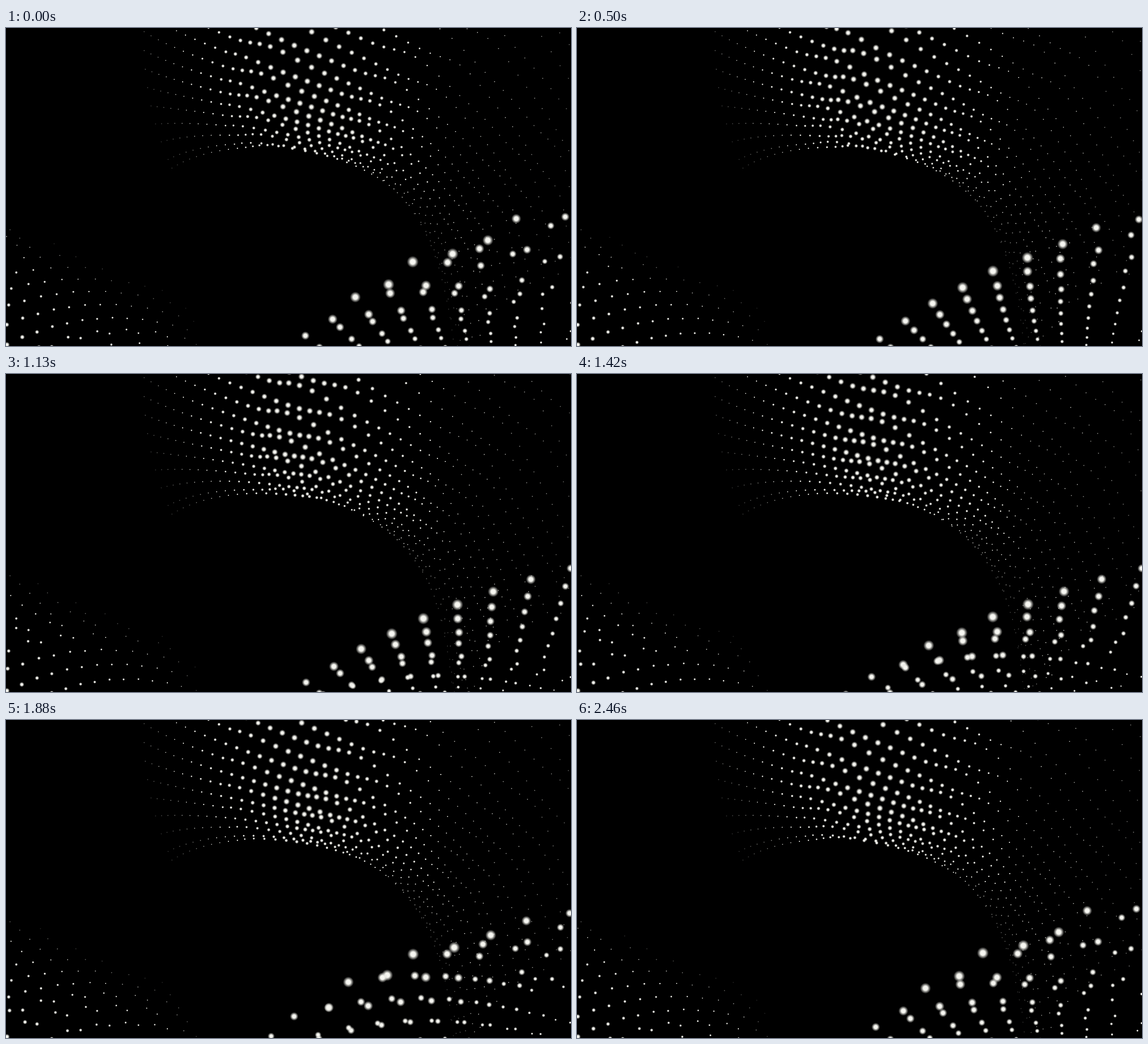
An HTML page with a canvas for the animation above (2500 ms loop, 998 by 561 pixels).

```html
<!DOCTYPE html>
<html lang="en">
<head>
<meta charset="utf-8">
<title>Particle waves</title>
<style>
  html, body { margin: 0; width: 100%; height: 100%; overflow: hidden; background: #000; }
  canvas { display: block; }
</style>
</head>
<body>
<canvas id="stage" width="998" height="561"></canvas>
<script>
const LOOP = 2500;
const ctx = document.getElementById('stage').getContext('2d');
const clamp = (x, lo, hi) => Math.min(hi, Math.max(lo, x));
const even = n => n % 2 === 0;

// Soft round dot, scaled for every particle.
const dotSprite = document.createElement('canvas');
dotSprite.width = dotSprite.height = 64;
const sctx = dotSprite.getContext('2d');
const glow = sctx.createRadialGradient(32, 32, 0, 32, 32, 32);
glow.addColorStop(0, 'rgba(250,250,246,1)');
glow.addColorStop(0.4, 'rgba(244,244,238,1)');
glow.addColorStop(0.7, 'rgba(230,230,224,.5)');
glow.addColorStop(1, 'rgba(200,200,195,0)');
sctx.fillStyle = glow;
sctx.fillRect(0, 0, 64, 64);

function dot(x, y, r) {
  if (r < 0.12 || x < -12 || x > 1010 || y < -12 || y > 573) return;
  const size = Math.max(r, 1) * 1.25;
  ctx.globalAlpha = Math.min(1, r);
  ctx.drawImage(dotSprite, x - size, y - size, size * 2, size * 2);
}

// Gaussian bump in time that repeats with the loop.
function pulse(t, peak, width) {
  const span = t - peak + LOOP / 2;
  const d = span - Math.floor(span / LOOP) * LOOP - LOOP / 2;
  return Math.exp(-((d / width) ** 2));
}

// Each sheet maps grid coordinates to the stage.
const hill = (u, v) => [
  504 + 395 * Math.tanh(u / 19) - (6.2 + 0.35 * u) * v + v * v,
  107 + 7 * u + 0.08 * u ** 2 + 0.004 * u ** 3
    + (20 - 0.6 * u + 0.02 * u * u) * v + (0.0025 * u * u - 0.75) * v * v
];

const valley = (a, b) => [
  4 + 4 * b + 1.3 * b * b + (28.5 + b) * a,
  490 - 32 * b + 1.6 * b * b + (1.8 * b - 9.5) * a + 0.9 * a * a
];

const crest = (c, r) => [
  535 + 43.6 * c + 1.78 * c * c + (19 - 3.6 * c) * r + (0.08 * c - 0.2) * r * r,
  549 - 32.75 * c + 0.875 * c * c + (14.5 + 2.3 * c) * r - (0.4 + 0.08 * c) * r * r
];

function drawHill(t) {
  for (let j = -14; j <= 8; j++) {
    const rowLag = even(j) ? 1.6 : -1.6;
    for (let i = -15; i <= 30; i++) {
      const peak = 1130 + (i - 2 - rowLag) / 0.0055;
      const push = pulse(t, peak, 480) * clamp((i + 6) / 5, 0, 1);
      const v = Math.min(j, 7.5) - 0.5 * push;
      const [x, y] = hill(i - 0.9 * push, v);
      const off = Math.abs(x - 515);
      const bell = 4.8 * Math.exp(-((off / (x < 515 ? 165 : 205)) ** 2));
      const floor = x > 515 ? clamp(0.8 - (x - 780) / 550, 0.35, 0.8) : 0;
      const horizon = Math.exp(-Math.max(0, v - 2) * (0.1 + off / 1500));
      dot(x, y, Math.max(bell, floor) * horizon);
    }
  }
}

function drawValley(t) {
  for (let row = -4; row <= 8; row++) {
    for (let col = -3; col <= 13; col++) {
      const push = even(col + row) ? 0.1 : pulse(t, 1340 - row * 300, 430);
      const [x, y] = valley(col + 0.22 * push, row + 0.37 * push);
      const near = Math.exp(-Math.max(0, x) / 260 - Math.max(0, 550 - y) / 200);
      const edge = clamp((y - 335 - 0.42 * x) / 80, 0, 1) * clamp((355 - x) / 80, 0, 1);
      dot(x, y, 4 * near * edge);
    }
  }
}

function drawCrest(t) {
  for (let c = -1; c <= 10; c++) {
    for (let r = 0; r <= 12; r++) {
      // The checkerboard swaps colour towards both ends of the ridge.
      const swapped = r < 2 * (Math.abs(c - 2.5) - 2.5);
      const moves = even(c + r) !== swapped;
      const amount = moves ? 1.05 : r === 0 ? 0.4 : 0.05;
      const push = amount * pulse(t, 2200 + 90 * (c - 4) - 110 * r, 550);
      const [x, y] = crest(c, r);
      const size = 8.4 * Math.exp(-(((c - 4) / 7) ** 2)) * 0.88 ** r;
      dot(x - 25 * push, y - 25 * push, size);
    }
  }
}

function frame() {
  const t = performance.now() % LOOP;
  ctx.globalAlpha = 1;
  ctx.fillStyle = '#000';
  ctx.fillRect(0, 0, 998, 561);
  drawHill(t);
  drawValley(t);
  drawCrest(t);
  requestAnimationFrame(frame);
}
frame();
</script>
</body>
</html>
```
